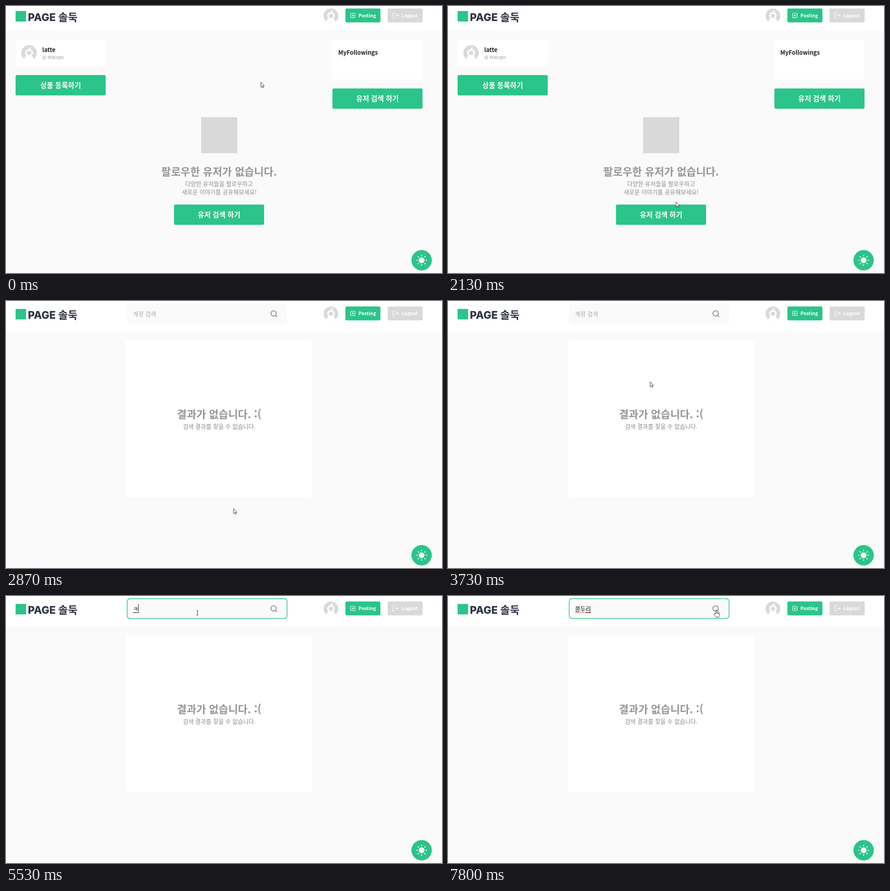
An HTML page that plays this animation: 956x586 px, repeating every 8000 ms.

```html
<!DOCTYPE html>
<html lang="ko">
<head>
<meta charset="utf-8">
<title>계정 검색</title>
<style>
  html, body { margin: 0; width: 100%; height: 100%; overflow: hidden; background: #fafafa; }
  svg { display: block; width: 956px; height: 586px; }
  text { font-family: "Noto Sans CJK KR", "Noto Sans CJK", sans-serif; font-size: 12.8px; }
  .b { font-weight: 700; }
  .mid { text-anchor: middle; }
  .btn { font-size: 15.36px; fill: #fff; }
  .small { font-size: 10.4px; fill: #fff; }
  .head { font-size: 23.04px; fill: #969696; }
  .note { fill: #8c8c8c; }
  .green { fill: #2bc48a; }
  .line { fill: none; stroke: #fff; stroke-width: 1.1; stroke-linecap: round; stroke-linejoin: round; }
</style>
</head>
<body>
<svg viewBox="0 0 956 586">
  <defs>
    <clipPath id="round"><circle r="16"/></clipPath>
    <g id="avatar">
      <circle r="16" fill="#d9d9d9"/>
      <g clip-path="url(#round)" fill="#fff">
        <path d="M-10.5 16C-10 9-6.5 5.5-3 5H3C6.5 5.5 10 9 10.5 16Z"/>
        <ellipse cy="-.2" rx="8.3" ry="7.8"/>
        <ellipse cy="0" rx="4.8" ry="4.3" fill="#d9d9d9"/>
        <path d="M-.8-7.5C-.6-10.5 1.5-12 4.5-11.5C4.3-9 2.5-7.5-.8-7.5Z"/>
      </g>
    </g>
    <g id="hand" fill="#fff" stroke="#222" stroke-width=".9" stroke-linejoin="round">
      <path d="M-1.3 9V.7C-1.3-.8 1.2-.8 1.2.7V5.2C2 4.400 3.7 5 3.7 6C4.3 5.3 5.6 5.6 5.6 6.8C6.3 6.3 7.2 6.8 7.2 7.8V11C7.2 13 6 13.5 6 15.5H-.8C-1.2 13-4 11-4.6 9C-5 7.5-3.3 7-2.5 8Z"/>
      <path d="M1.2 5.2V8M3.7 6V8.3M5.6 6.8V8.6" fill="none"/>
    </g>
    <path id="arrow" d="M0 .3V11.3L2.5 8.9 4.1 12.6 5.8 11.9 4.2 8.3H7.6Z" fill="#fff" stroke="#222" stroke-width=".9"/>
    <path id="beam" d="M-2.2-5H-.5L0-4.6.5-5H2.2M0-4.6V4.6M-2.2 5H-.5L0 4.6.5 5H2.2" fill="none" stroke="#333" stroke-width="1"/>
    <filter id="shadow" x="-20%" y="-20%" width="140%" height="140%">
      <feDropShadow dx="0" dy="1" stdDeviation="1.5" flood-opacity=".25"/>
    </filter>
  </defs>

  <rect width="956" height="586" fill="#fafafa"/>
  <rect id="bar" width="956" height="55" fill="#fff"/>

  <g id="header">
    <rect class="green" x="21" y="11" width="23" height="23"/>
    <text class="b" y="33" fill="#2f3444" style="font-size:23px"><tspan x="48" style="font-family:Inter,sans-serif;font-weight:800">PAGE</tspan><tspan x="114.5" style="font-weight:900">솔둑</tspan></text>
    <use href="#avatar" x="712.5" y="21.5"/>
    <rect class="green" x="744.2" y="5.6" width="76.8" height="30.4" rx="3"/>
    <rect class="line" x="755.7" y="15.8" width="9.8" height="9.8" rx="2"/>
    <path class="line" d="M758.3 20.7H762.9M760.6 18.4V23"/>
    <text class="b small" x="772.8" y="24.5">Posting</text>
    <rect x="836.8" y="5.6" width="76.8" height="30.4" rx="3" fill="#d9d9d9"/>
    <path class="line" d="M852 15.5H848.5V26H852M852 20.7H860.5M857.7 17.8L860.6 20.7 857.7 23.6"/>
    <text class="b small" x="867" y="24.5">Logout</text>
  </g>

  <g id="home">
    <rect x="21" y="74" width="197.6" height="58.5" rx="4" fill="#fff"/>
    <use href="#avatar" transform="translate(50.5 103) scale(1.06)"/>
    <text class="b" x="79.5" y="100.5" fill="#222">latte</text>
    <text x="79.5" y="116" fill="#999" style="font-size:9.6px">@ teacups</text>
    <rect class="green" x="21" y="151.6" width="197.6" height="44.6" rx="3"/>
    <text class="b btn mid" x="119.8" y="180">상품 등록하기</text>

    <rect x="715.7" y="74" width="197.6" height="87.5" rx="4" fill="#fff"/>
    <text class="b" x="728.5" y="107" fill="#222">MyFollowings</text>
    <rect class="green" x="715.7" y="180.9" width="197.6" height="44.6" rx="3"/>
    <text class="b btn mid" x="814.5" y="209">유저 검색 하기</text>

    <rect x="428" y="244" width="79" height="79" fill="#d9d9d9"/>
    <text class="b head mid" x="467.2" y="372">팔로우한 유저가 없습니다.</text>
    <text class="note mid" x="467.2" y="395">다양한 유저들을 팔로우하고</text>
    <text class="note mid" x="467.5" y="412.5">새로운 이야기를 공유해보세요!</text>
    <rect class="green" x="368.3" y="435.7" width="197.6" height="44.6" rx="3"/>
    <text class="b btn mid" x="467.2" y="464">유저 검색 하기</text>
  </g>

  <g id="search">
    <rect x="263" y="86" width="408.5" height="344.5" rx="6" fill="#fff"/>
    <text class="b head mid" x="467.5" y="257">결과가 없습니다. :(</text>
    <text class="note mid" x="467.5" y="280">검색 결과를 찾을 수 없습니다.</text>
    <rect id="field" x="265.7" y="5.7" width="350.6" height="43.8" rx="6.5" fill="#fafafa" stroke-width="1.5"/>
    <g fill="none" stroke="#8a8a8a" stroke-width="1.8" stroke-linecap="round">
      <circle cx="586.8" cy="27.3" r="5.9"/><path d="M591.2 31.7L594 34.4"/>
    </g>
    <text id="value" x="278.3" y="33"></text>
    <path id="squiggle" fill="none" stroke="#e33" stroke-width=".9"/>
    <path id="compose" stroke="#111" stroke-width="1"/>
    <path id="caret" d="M0 18V37" stroke="#111" stroke-width="1"/>
    <rect id="popup" x="280" y="53" width="100" height="144" rx="4" fill="#fff" filter="url(#shadow)"/>
  </g>

  <g transform="translate(911.3 558)">
    <circle class="green" r="22.4"/>
    <circle r="6.3" fill="#fff"/>
    <g id="rays" stroke="#fff" stroke-width="1.7" stroke-linecap="round"></g>
  </g>

  <use id="cursor"/>
</svg>

<script>
const LOOP = 8000, STEP = 1000 / 15;
const OPEN = 2870, FOCUS = 4470, POPUP = 4530, TYPE = 5400, COMMIT = 6870;
const KEY_GAP = 133, LAST_KEY = 6140, CHAR_W = 11.8, FIELD_X = 278.3, BLINK = 530;
const typed = ['ㅋ', '코', '콩', '콩ㄷ', '콩두', '콩두ㄹ', '콩두리'];

// time, x, y of the hotspot, and the pointer used from then on
const track = [
  [0, 559, 167, 'arrow'], [1400, 559, 167, 'arrow'], [1467, 558.5, 176, 'arrow'],
  [1733, 541, 262, 'arrow'], [2000, 506, 390, 'arrow'], [2133, 500, 430, 'arrow'],
  [2267, 504, 447, 'arrow'], [2333, 501, 453, 'hand'], [2400, 499.5, 456, 'hand'],
  [2667, 499, 455.5, 'arrow'], [3067, 499, 455.5, 'arrow'], [3333, 487, 375, 'arrow'],
  [3667, 448, 200, 'arrow'], [3933, 429, 108, 'arrow'], [4133, 421, 58, 'arrow'],
  [4200, 420, 44, 'beam'], [4267, 419.5, 37, 'beam'], [6800, 419.5, 37, 'beam'],
  [7000, 441, 20, 'beam'], [7200, 460, 9, 'beam'], [7333, 460, 9, 'beam'],
  [7467, 496, 1, 'arrow'], [7533, 530, 5, 'arrow'], [7600, 558, 13, 'beam'],
  [7733, 585, 27, 'hand'], [7800, 588, 31, 'hand'], [LOOP, 588, 31, 'hand']
];

const $ = id => document.getElementById(id);
const show = (id, on) => $(id).setAttribute('display', on ? 'inline' : 'none');
const set = (id, attrs) => {
  for (const name in attrs) $(id).setAttribute(name, attrs[name]);
};

$('rays').innerHTML = Array.from({ length: 8 }, (_, i) =>
  `<path d="M0-9.3V-11.5" transform="rotate(${i * 45})"/>`).join('');

let wave = `M${FIELD_X} 35`;
for (let x = FIELD_X + 1.5, i = 0; x <= 313; x += 1.5, i++) wave += `L${x} ${i % 2 ? 35 : 36.6}`;
set('squiggle', { d: wave });

function pointer(t) {
  let i = 0;
  while (i < track.length - 2 && track[i + 1][0] <= t + 1) i++;
  const [t0, x0, y0, shape] = track[i], [t1, x1, y1] = track[i + 1];
  const k = Math.min(1, Math.max(0, (t - t0) / (t1 - t0)));
  return { x: x0 + (x1 - x0) * k, y: y0 + (y1 - y0) * k, shape };
}

function caretOn(t) {
  if (t < FOCUS) return false;
  const since = t < TYPE ? FOCUS : Math.min(LAST_KEY, t);
  return Math.floor((t - since) / BLINK) % 2 === 0;
}

function render(time) {
  const t = time % LOOP;
  const searching = t >= OPEN, focused = t >= FOCUS;

  show('home', !searching);
  show('search', searching);
  set('bar', { height: searching ? 67 : 55 });
  set('header', { transform: `translate(0 ${searching ? 6.4 : 0})` });
  set('field', { stroke: focused ? '#2bc48a' : 'none' });

  const key = Math.min(typed.length - 1, Math.floor((t - TYPE) / KEY_GAP));
  const word = key < 0 ? '' : typed[key];
  $('value').textContent = word || '계정 검색';
  set('value', { fill: word ? '#111' : '#aaa' });

  const end = FIELD_X + word.length * CHAR_W;
  show('compose', word);
  set('compose', { d: `M${end - CHAR_W} 36.5H${end - .4}` });
  show('squiggle', t >= COMMIT);
  show('caret', caretOn(t));
  set('caret', { transform: `translate(${end + .3} 0)` });
  show('popup', t >= POPUP && t < TYPE);

  const p = pointer(Math.floor((t + 4) / STEP) * STEP);
  set('cursor', { href: '#' + p.shape, transform: `translate(${p.x} ${p.y})` });
}

function tick() {
  render(performance.now());
  requestAnimationFrame(tick);
}
tick();
</script>
</body>
</html>
```
